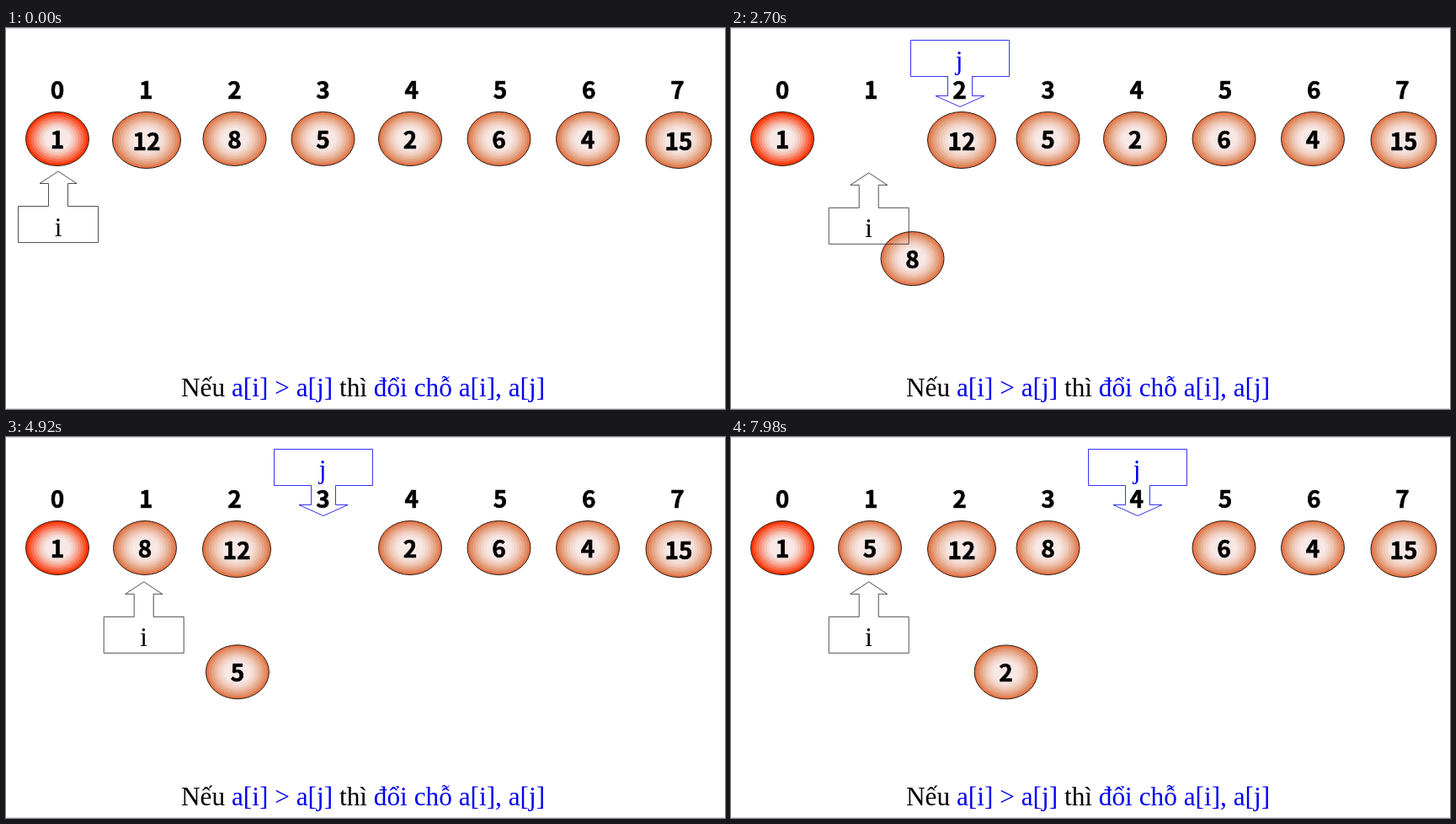
Write an HTML page with a canvas that moves like this. It is 854 by 452 pixels and loops after 8 s.

```html
<!DOCTYPE html>
<html lang="vi">
<head>
<meta charset="utf-8">
<title>Sắp xếp</title>
<style>
  html, body { margin: 0; width: 100%; height: 100%; overflow: hidden; background: #fff; }
  canvas { display: block; }
</style>
</head>
<body>
<canvas id="stage" width="854" height="452"></canvas>
<script>
const ctx = document.getElementById('stage').getContext('2d');
const LOOP = 8000, TICK = 30, DUR = 590;
const DIGITS = 'bold 28px "Noto Sans CJK SC", "Noto Sans CJK JP", "Noto Sans CJK", "Open Sans", sans-serif';
const SERIF = '31.3px "Liberation Serif", "Times New Roman", serif';
const BLUE = '#0000f0', INK = '#000';
const TAN = ['#e5764a', '#e1916a', '#e4a585', '#eab69d', '#efc7b6', '#f2d4c9', '#f5dfd9', '#f7e8e5'];
const RED = ['#ff3300', '#fb5530', '#fa7353', '#f8917a', '#f6ae9c', '#f5c7bb', '#f5dad4', '#f7e8e5'];

const slotX = i => 61 + i * 105.2;
const balls = [1, 12, 8, 5, 2, 6, 4, 15].map((value, i) => ({
  value,
  x: [61, 167, 271.5, 376.5, 480, 585.5, 691, 799][i],
  y: value > 9 ? 133 : 131.5,
  rx: value === 12 ? 40.5 : value === 15 ? 39 : 37.5,
  ry: value > 9 ? 33.5 : 32,
  bands: i ? TAN : RED
}));

// value, start time, destination
const moves = [
  [8, 1420, 218, 280.5], [12, 2003, 274, 133], [8, 2610, 165, 131.5],
  [5, 4400, 272, 283], [8, 5005, 376.5, 131.5], [5, 5597, 165, 131.5],
  [2, 7400, 326.5, 279]
];
// start time, the two compared values
const pulses = [[822, 12, 8], [3822, 8, 5], [6815, 5, 2]];

const clamp = v => Math.max(0, Math.min(1, v));
const mix = (a, b, k) => a + (b - a) * k;
const phase = (t, start, dur = DUR) => clamp((t - start) / dur);
const ease = p => p < 0.5 ? 2 * p * p : 1 - 2 * (1 - p) * (1 - p);
const slide = (t, start) => ease(phase(t, start));

function text(str, x, y, font, color, align = 'center') {
  ctx.font = font;
  ctx.fillStyle = color;
  ctx.textAlign = align;
  ctx.fillText(str, x, y);
}

// A thin stroke makes the numerals a little heavier than bold.
function digits(value, x, y) {
  text(value, x, y, DIGITS, INK);
  ctx.lineWidth = 0.6;
  ctx.lineJoin = 'round';
  ctx.strokeStyle = INK;
  ctx.strokeText(value, x, y);
  ctx.lineJoin = 'miter';
}

function oval(rx, ry) {
  ctx.beginPath();
  ctx.ellipse(0, 0, rx, ry, 0, 0, Math.PI * 2);
}

function drawBall(ball, t) {
  let { x, y, rx, ry } = ball, scale = 1, fade = 0;
  for (const [value, start, toX, toY] of moves) {
    if (value !== ball.value) continue;
    const k = slide(t, start);
    x = mix(x, toX, k);
    y = mix(y, toY, k);
  }
  for (const [start, a, b] of pulses) {
    if (ball.value !== a && ball.value !== b) continue;
    const p = phase(t, start), tent = Math.min(p, 1 - p);
    scale += 0.1 * tent;
    fade += Math.min(0.5, tent * 2.5);
  }
  ctx.save();
  ctx.translate(x, y);
  ctx.scale(scale, scale);
  ball.bands.forEach((color, i) => {
    const k = 1 - i * 0.085;
    oval(rx * k, ry * k);
    ctx.fillStyle = color;
    ctx.fill();
  });
  oval(rx, ry);
  ctx.lineWidth = 1;
  ctx.strokeStyle = '#2a1a10';
  ctx.stroke();
  digits(ball.value, 0, 11.5);
  if (fade > 0) {
    oval(rx + 1, ry + 1);
    ctx.fillStyle = `rgba(255,255,255,${fade})`;
    ctx.fill();
  }
  ctx.restore();
}

// Box with an arrow; heights run from the tip towards the far side of the box.
function callout(x, tip, neck, near, far, stem, head, half, color) {
  const side = [[0, tip], [head, neck], [stem, neck], [stem, near], [half, near], [half, far]];
  const mirror = side.slice(1).reverse().map(([dx, y]) => [-dx, y]);
  ctx.beginPath();
  for (const [dx, y] of side.concat(mirror)) ctx.lineTo(x + dx, y);
  ctx.closePath();
  ctx.lineWidth = 0.8;
  ctx.strokeStyle = color;
  ctx.stroke();
}

function drawI(t) {
  const k = slide(t, 35), x = 62 + 101.7 * k, dy = 1.8 * k;
  callout(x, 170 + dy, 184.5 + dy, 211.5 + dy, 254.5 + dy, 11.5, 22, 47.5, '#2b1f24');
  text('i', x, 246.5 + dy, SERIF, INK);
}

function drawJ(t) {
  const x = 272 + 105 * slide(t, 3229) + 106 * slide(t, 6211);
  ctx.globalAlpha = phase(t, 630, 180);
  callout(x, 93.5, 80.5, 57.5, 14.5, 14.5, 29, 58.5, BLUE);
  text('j', x - 1, 48.5, SERIF, BLUE);
  ctx.globalAlpha = 1;
}

function drawCaption() {
  const parts = [['Nếu ', INK], ['a[i] > a[j]', BLUE], [' thì ', INK], ['đổi chỗ a[i], a[j]', BLUE]];
  let x = 208;
  for (const [str, color] of parts) {
    text(str, x, 437, SERIF, color, 'left');
    x += ctx.measureText(str).width;
  }
}

function draw(t) {
  ctx.fillStyle = '#fff';
  ctx.fillRect(0, 0, 854, 452);
  ctx.fillStyle = '#d9d9d9';
  ctx.fillRect(0, 0, 854, 1);
  ctx.fillRect(0, 451, 854, 1);
  for (let i = 0; i < 8; i++) digits(i, slotX(i), 84);
  for (const ball of balls) drawBall(ball, t);
  drawI(t);
  drawJ(t);
  drawCaption();
}

const begin = performance.now();
function frame() {
  const t = (performance.now() - begin) % LOOP;
  draw(Math.floor(t / TICK) * TICK);
  requestAnimationFrame(frame);
}
frame();
</script>
</body>
</html>
```
